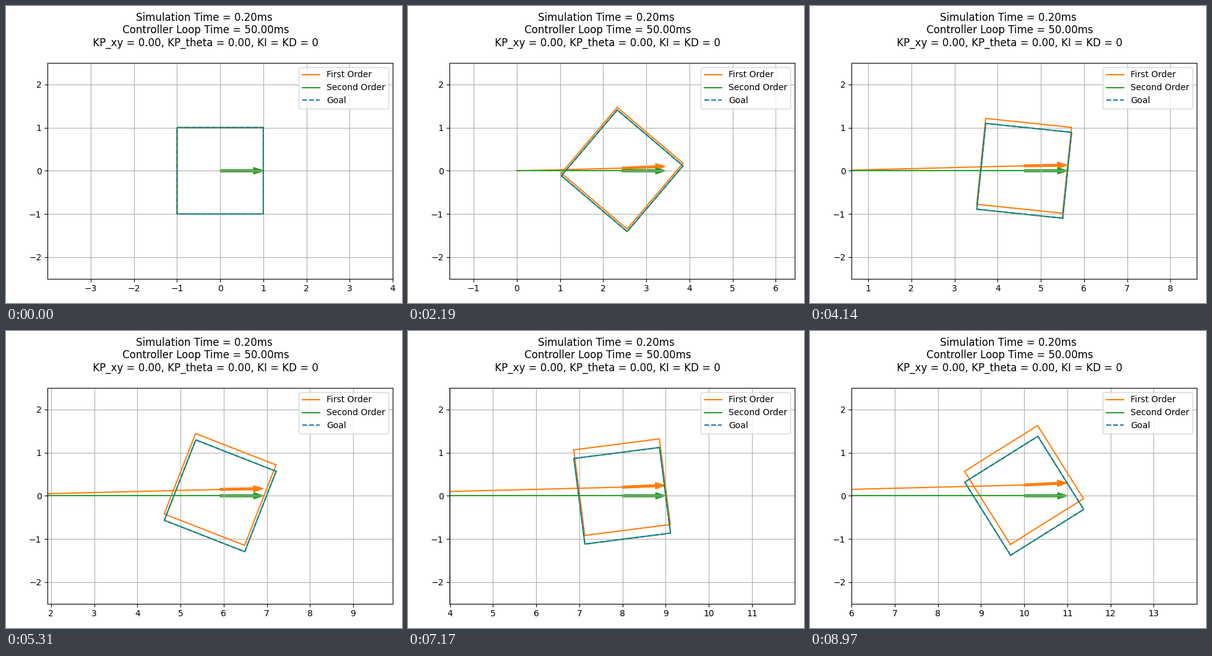
Recreate the animation shown at these times as a matplotlib script. Size 640x480 px, loop 9000 ms.

```python
import numpy as np
import matplotlib.pyplot as plt
from matplotlib.animation import FuncAnimation
from matplotlib.ticker import MultipleLocator

FRAMES = 300
LOOP = 0.05       # controller period, s
OMEGA = 0.9985    # rad/s
TIMES = np.linspace(0.0002, 9.9998, FRAMES)
CORNERS = np.array([[1, 1], [1, -1], [-1, -1], [-1, 1], [1, 1]], float)


def first_order(t):
    """Position and drift angle when heading is only refreshed each loop."""
    steps = np.floor(t / LOOP)
    phi = OMEGA * (t - steps * LOOP)
    full = OMEGA * LOOP
    x = (steps * np.sin(full) + np.sin(phi)) / OMEGA
    y = (steps * (1 - np.cos(full)) + 1 - np.cos(phi)) / OMEGA
    return x, y, phi


def second_order(t):
    return t, 0 * t, 0 * t


class Robot:
    def __init__(self, ax, motion, color, label):
        self.path = motion(TIMES)
        self.box, = ax.plot([], [], color=color, label=label)
        self.trail, = ax.plot([], [], color=color)
        self.arrow = ax.arrow(0, 0, 1, 0, width=0.05, color=color,
                              length_includes_head=True)

    def update(self, i, square):
        x, y, phi = (v[i] for v in self.path)
        self.box.set_data(square[:, 0] + x, square[:, 1] + y)
        self.trail.set_data(np.r_[0, self.path[0][:i + 1]],
                            np.r_[0, self.path[1][:i + 1]])
        self.arrow.set_data(x=x, y=y, dx=np.cos(phi), dy=np.sin(phi))


fig = plt.figure(figsize=(6.4, 4.8), dpi=100)
fig.suptitle("Simulation Time = 0.20ms\n Controller Loop Time = 50.00ms\n"
             " KP_xy = 0.00, KP_theta = 0.00, KI = KD = 0")
ax = fig.add_axes([67.2 / 640, 39.3 / 480, 558 / 640, 348.75 / 480])
ax.set_ylim(-2.5, 2.5)
ax.xaxis.set_major_locator(MultipleLocator(1))
ax.yaxis.set_major_locator(MultipleLocator(1))
ax.grid(True)

robots = [Robot(ax, first_order, "C1", "First Order"),
          Robot(ax, second_order, "C2", "Second Order")]
goal, = ax.plot([], [], "--", color="C0", label="Goal")
ax.legend(loc="upper right")


def update(i):
    t = TIMES[i]
    c, s = np.cos(OMEGA * t), np.sin(OMEGA * t)
    square = CORNERS @ np.array([[c, s], [-s, c]])
    for robot in robots:
        robot.update(i, square)
    goal.set_data(square[:, 0] + t, square[:, 1])
    ax.set_xlim(t - 4, t + 4)
    return []


anim = FuncAnimation(fig, update, frames=FRAMES, interval=30,
                     repeat=True, repeat_delay=0, blit=False)
plt.show()
```
